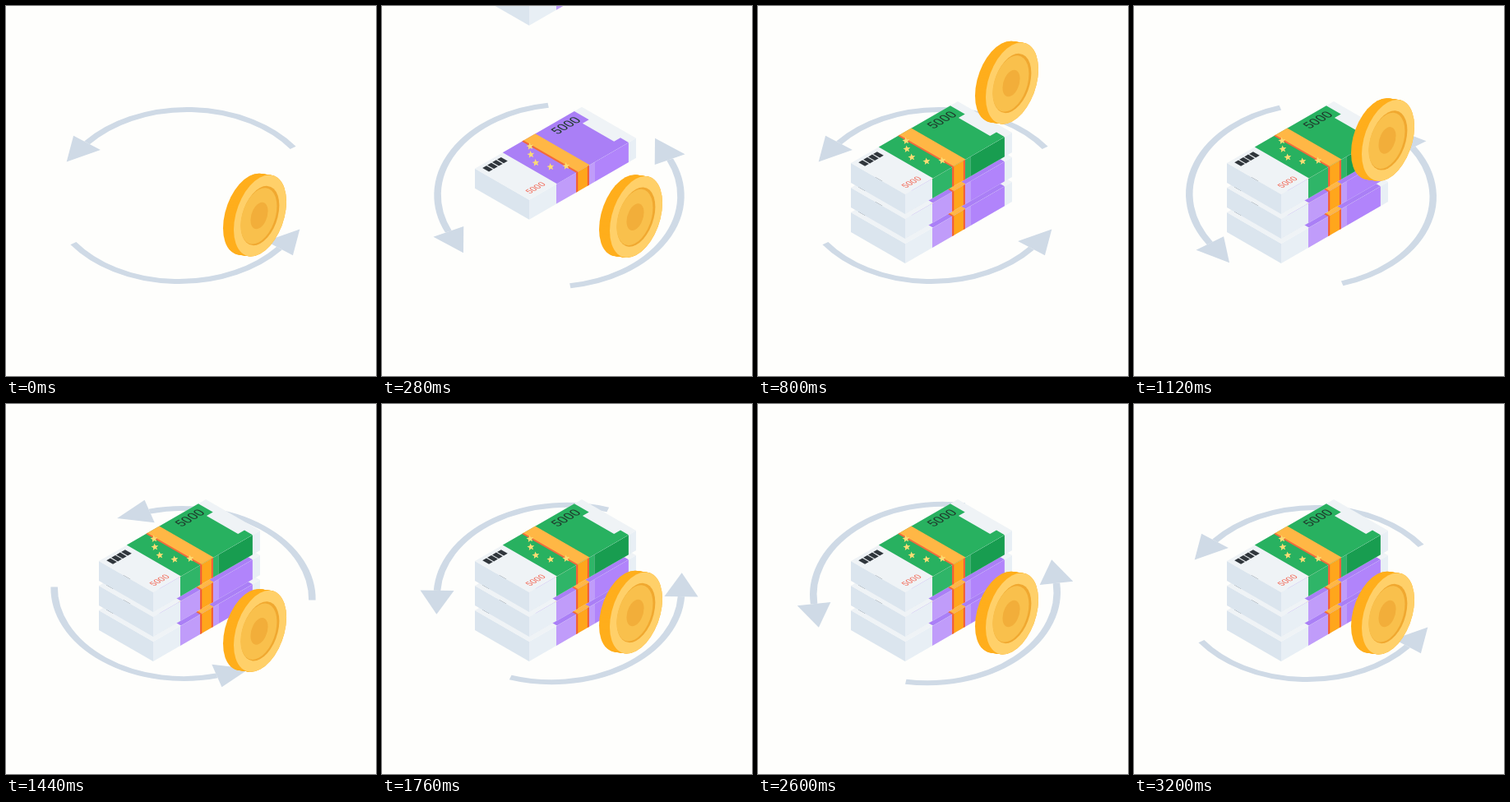
These frames come from a looping animation (450x450 px, 3240 ms). An HTML page:

```html
<!DOCTYPE html>
<html lang="en">
<head>
<meta charset="utf-8">
<title>Money cycle</title>
<style>
  html, body { margin: 0; width: 100%; height: 100%; overflow: hidden; background: #fefefc; }
  svg { display: block; width: 100%; height: 100%; }
  text { font-family: Roboto, "Liberation Sans", sans-serif; }
</style>
</head>
<body>
<svg id="stage" viewBox="0 0 450 450"></svg>
<script>
(() => {
  const LOOP = 3240, STEP = 40;
  const byId = id => document.getElementById(id);

  // Isometric slab: u runs along the long side, v along the short side, z down.
  const iso = (u, v, z = 0) => [179 + 130 * u - 66 * v, 229 - 75 * u - 38 * v + z];
  const poly = (fill, pts) =>
    `<polygon fill="${fill}" points="${pts.map(p => iso(...p).map(n => n.toFixed(1))).join(' ')}"/>`;
  const lid = (fill, u0, u1, v0 = 0, v1 = 1) =>
    poly(fill, [[u0, v0], [u1, v0], [u1, v1], [u0, v1]]);
  const side = (fill, u0, u1) =>
    poly(fill, [[u0, 0], [u1, 0], [u1, 0, 24], [u0, 0, 24]]);
  const label = (x, y, size, fill) =>
    `<text transform="matrix(.866 -.5 .866 .5 ${x} ${y})" font-size="${size}" fill="${fill}">5000</text>`;

  function star(x, y) {
    const pts = Array.from({ length: 10 }, (_, i) => {
      const a = i * Math.PI / 5 - 1.7, r = i % 2 ? 2 : 4.6;
      return [(x + r * Math.cos(a)).toFixed(1), (y + r * Math.sin(a)).toFixed(1)];
    });
    return `<polygon fill="#fbdc74" points="${pts.join(' ')}"/>`;
  }

  function bundle(i, main, light, dark) {
    const bars = [0, 1, 2, 3].map(n => lid('#30363c', .04 + .046 * n, .077 + .046 * n, .82, .94));
    const stars = [[180, 164], [181, 174], [187, 184], [205, 189], [224, 188]].map(p => star(...p));
    return `<g id="bundle${i}">` +
      poly('#dbe5ee', [[0, 0], [0, 1], [0, 1, 24], [0, 0, 24]]) +
      side('#e8eff5', 0, 1) + side(light, .254, .44) + side(light, .56, .61) + side(dark, .61, .93) +
      lid('#eff3f6', 0, 1) +
      poly(main, [[.26, 0], [.93, 0], [.93, .15], [.87, .15], [.87, .73], [.93, .73], [.93, 1], [.26, 1]]) +
      side('#ffa61c', .44, .56) + side('#f0583a', .44, .455) + side('#f0583a', .545, .56) +
      lid('#ffb745', .445, .565) + lid('#f26a3c', .44, .455) +
      bars.join('') + stars.join('') +
      label(213, 150, 15.5, '#1f3a2c') + label(179.5, 222, 10.4, '#f26a58') + '</g>';
  }

  const arrow = '<path d="M-133.6 83A157.7 157.7 0 0 0 117 91.5" fill="none" stroke="#cfdae6" stroke-width="8.5"/>' +
    '<path d="M141.8 58.5L133.4 103.8L100.6 79.2Z" fill="#cfdae6"/>';

  const disc = (fill, r, dx = 0, dy = 0) =>
    `<circle r="${r}" fill="${fill}" transform="matrix(32 -17 0 46.5 ${309 + dx} ${255 + dy})"/>`;
  const edge = Array.from({ length: 14 }, (_, i) => disc('#ffae1c', 1, i - 13, (i - 13) * .14)).join('');

  byId('stage').innerHTML =
    `<g id="arrows">${arrow}<g transform="rotate(180)">${arrow}</g></g>` +
    bundle(0, '#aa7ff6', '#c09cfa', '#b184fb') +
    bundle(1, '#aa7ff6', '#c09cfa', '#b184fb') +
    bundle(2, '#28b160', '#2fb568', '#189d50') +
    `<g id="coin">${edge}${disc('#ffd069', 1)}${disc('#f0a830', .73)}${disc('#f9c04c', .69, -1.6, .4)}${disc('#f2ae3a', .33, -1)}</g>`;

  const [arrows, coin, ...bundles] = ['arrows', 'coin', 'bundle0', 'bundle1', 'bundle2'].map(byId);
  const shift = (el, y) => el.setAttribute('transform', `translate(0 ${y.toFixed(2)})`);

  // Coin height over time: wind-up, leap, overshoot, settle.
  const leap = [[0, 0], [400, 2], [480, -4.5], [560, 115], [920, -253], [1340, 96],
    [1500, -12], [1640, 3], [1760, -1], [1880, 0], [LOOP, 0]];
  function coinY(t) {
    const i = leap.findIndex(k => k[0] > t);
    const [t0, y0] = leap[i - 1], [t1, y1] = leap[i];
    return y0 + (y1 - y0) * (1 - Math.cos(Math.PI * (t - t0) / (t1 - t0))) / 2;
  }

  function draw(now) {
    const t = Math.floor(now % LOOP / STEP) * STEP;
    arrows.setAttribute('transform', `translate(215.5 230.5) scale(1 .7) rotate(${-.225 * t})`);
    bundles.forEach((el, i) => {
      const x = Math.min(1, (t - 26 - 176 * i) / 400);
      el.style.display = x < 0 ? 'none' : '';
      shift(el, 60 - 30 * i - 400 * (1 - x) ** 2);
    });
    shift(coin, coinY(t));
  }

  const start = performance.now();
  function tick() {
    draw(Math.max(0, performance.now() - start));
    requestAnimationFrame(tick);
  }
  tick();
})();
</script>
</body>
</html>
```
